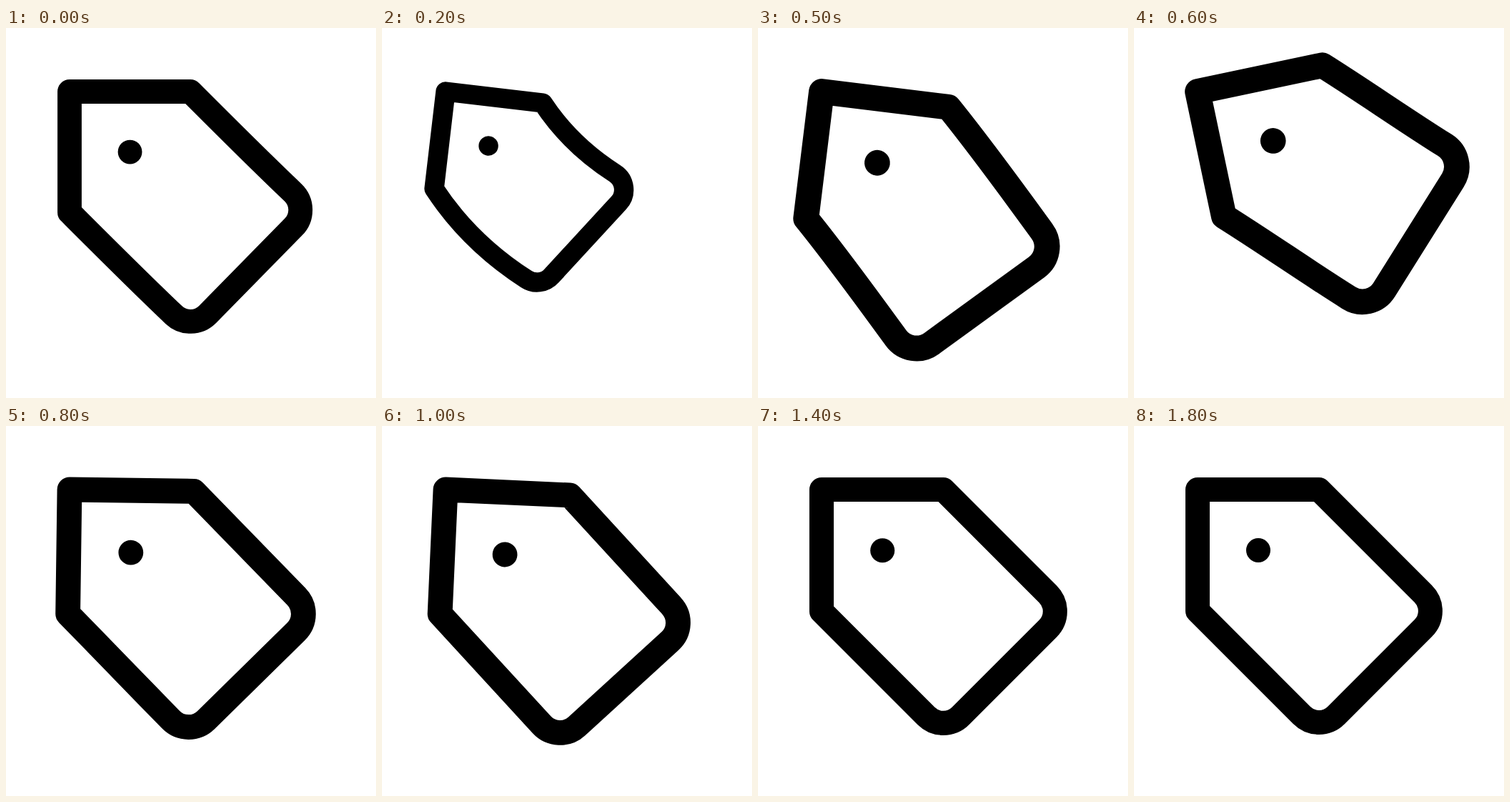
An HTML page for the animation above (2.7 s loop, 518 by 518 pixels).

```html
<!DOCTYPE html>
<html lang="en">
<head>
<meta charset="utf-8">
<title>Swinging tag</title>
<style>
  html, body { margin: 0; height: 100%; overflow: hidden; background: #fff; }
  svg { display: block; width: 100vw; height: 100vh; }
</style>
</head>
<body>
<svg viewBox="0 0 518 518">
  <g id="tag">
    <path id="outline" fill="none" stroke="#000" stroke-width="2" stroke-linejoin="round"/>
    <circle cx="5" cy="5" r="1"/>
  </g>
</svg>
<script>
const LOOP = 2700, STEP = 100, LAST = 1800;
const UNIT = 17, PIVOT = 89;   // pixels per icon unit, top-left corner of the tag
const RADIUS = 2, HALF = 3.585, MID = 13.585;

// time, swing, scale, tip shift x, y, tip turn, side angle at its start, at its end
const KEYS = [
  [0, 0, .995, -.03, -.17, -.5, 0, -1.5],
  [100, 2.8, .9, .35, -.8, -5, 2.5, -10],
  [200, 6.7, .806, .71, -1.41, -9, 5, -19],
  [400, 20.2, 1.01, -.82, .3, 9.3, -8, 12],
  [500, 7, 1.053, -.3, 0, 2, -1, 2],
  [600, -11.9, 1.05, -.39, -.39, -1, -1, -1],
  [900, 5, 1.015, -.15, -.15, 0, 0, 0],
  [1000, 2.6, 1.025, -.02, -.07, 0, 0, 0],
  [1200, -2.8, 1.005, 0, 0, 0, 0, 0],
  [1400, 0, 1.003, 0, 0, 0, 0, 0],
  [1800, 0, 1, 0, 0, 0, 0, 0]
];

const tag = document.getElementById('tag');
const outline = document.getElementById('outline');

const polar = deg => [Math.cos(deg * Math.PI / 180), Math.sin(deg * Math.PI / 180)];
const add = (p, v, k) => [p[0] + v[0] * k, p[1] + v[1] * k];
const put = (...points) => points.map(p => p.map(n => n.toFixed(3)).join(' ')).join(' ');

function poseAt(t) {
  let i = 0;
  while (i < KEYS.length - 2 && t >= KEYS[i + 1][0]) i++;
  const a = KEYS[i], b = KEYS[i + 1];
  const k = Math.min(1, (t - a[0]) / (b[0] - a[0]));
  const ease = (1 - Math.cos(Math.PI * k)) / 2;
  return a.slice(1).map((v, j) => v + (b[j + 1] - v) * ease);
}

function outlinePath(dx, dy, turn, from, to) {
  const top = [10, 0], left = [0, 10];
  const mid = [MID + dx, MID + dy];
  const across = polar(turn - 45), axis = polar(turn + 45);
  const right = add(mid, across, HALF * Math.SQRT2);
  const bottom = add(mid, across, -HALF * Math.SQRT2);
  const start = polar(45 + from), end = polar(45 + to), normal = polar(to - 45);
  const r1 = add(right, normal, RADIUS), r2 = add(right, axis, RADIUS);
  const b1 = add(bottom, axis, RADIUS), b2 = add(bottom, normal, -RADIUS);
  const reach = (p, q) => Math.hypot(q[0] - p[0], q[1] - p[1]) / 3;
  const h1 = reach(top, r1), h2 = reach(left, b2);
  const arc = `A${RADIUS} ${RADIUS} 0 0 1 `;
  return 'M0 0L' + put(top) +
    'C' + put(add(top, start, h1), add(r1, end, -h1), r1) + arc + put(r2) +
    'L' + put(b1) + arc + put(b2) +
    'C' + put(add(b2, end, -h2), add(left, start, h2), left) + 'Z';
}

function draw(ms) {
  const t = Math.min(LAST, Math.floor(ms % LOOP / STEP) * STEP);
  const [swing, scale, ...bend] = poseAt(t);
  tag.setAttribute('transform',
    `translate(${PIVOT} ${PIVOT}) rotate(${swing}) scale(${UNIT * scale})`);
  outline.setAttribute('d', outlinePath(...bend));
}

let origin;
function tick(now) {
  origin ??= now;
  draw(now - origin);
  requestAnimationFrame(tick);
}
draw(0);
requestAnimationFrame(tick);
</script>
</body>
</html>
```
